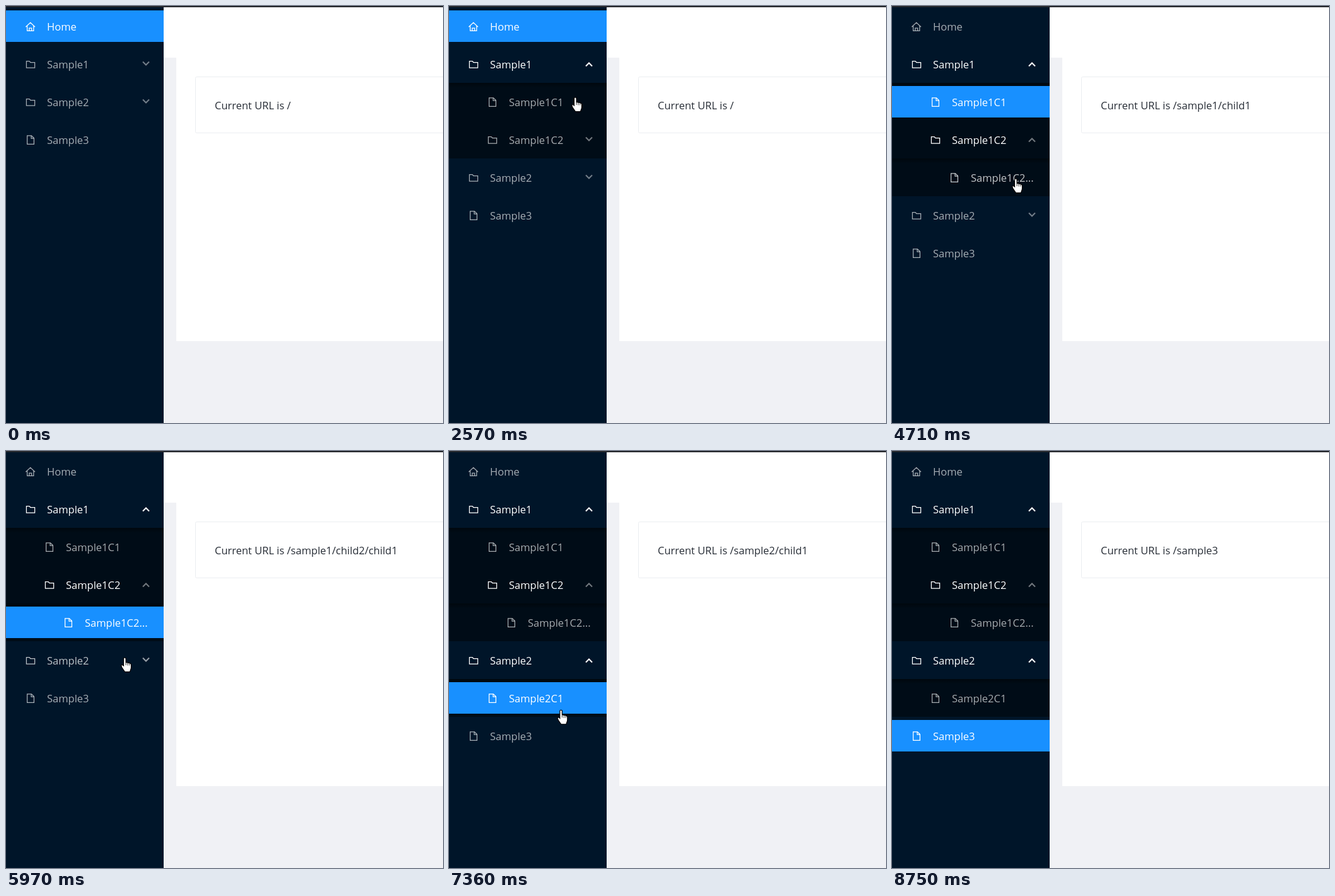
An HTML page with a canvas for the animation above (9.74 s loop, 693x662 px).

```html
<!DOCTYPE html>
<html lang="en">
<head>
<meta charset="utf-8">
<title>Sidebar menu</title>
<style>
html, body { margin: 0; width: 100%; height: 100%; overflow: hidden; background: #f0f1f5; }
canvas { display: block; }
</style>
</head>
<body>
<canvas id="stage" width="693" height="662"></canvas>
<script>
const ctx = document.getElementById('stage').getContext('2d');
const LOOP = 9740, ROW = 60, SIDE = 250;
const FONT = '16.5px "Open Sans", "Noto Sans", sans-serif';

// lit: text turns white, sel: blue background, open: submenu unfolds (ms)
const menu = [
  { label: 'Home', icon: 'home', lit: [-999, 2710], sel: [-999, 2710] },
  { label: 'Sample1', icon: 'folder', lit: [950], open: 1940, kids: [
    { label: 'Sample1C1', icon: 'file', lit: [2560, 4780], sel: [2710, 4780] },
    { label: 'Sample1C2', icon: 'folder', lit: [3480], open: 3970, kids: [
      { label: 'Sample1C2...', icon: 'file', lit: [4580, 6630], sel: [4780, 6630] }
    ] }
  ] },
  { label: 'Sample2', icon: 'folder', lit: [5850], open: 6050, kids: [
    { label: 'Sample2C1', icon: 'file', lit: [6480, 7740], sel: [6630, 7740] }
  ] },
  { label: 'Sample3', icon: 'file', lit: [7480], sel: [7740] }
];

const urls = [[0, '/'], [2710, '/sample1/child1'], [4780, '/sample1/child2/child1'],
  [6630, '/sample2/child1'], [7740, '/sample3']];

// Pointer stops: time, x, y
const stops = [
  [330, 442, 614], [1100, 197, 64], [1400, 198, 80], [1540, 197, 82], [2100, 197, 82],
  [2570, 195, 145], [3050, 195, 147], [3700, 193, 200], [4200, 193, 200], [4710, 191, 274],
  [5200, 190, 275], [5970, 183, 328], [6250, 182, 329], [6700, 175, 388], [7150, 175, 389],
  [7650, 168, 447], [8130, 168, 447], [8750, 258, 665]
];

// Icons are drawn around the row centre, x = 0 at the icon's left edge
const icons = {
  home: new Path2D('M.3 1.3 7.7-5.6 15 1.3M2.6-.3V7.4H12.8V-.3M5.8 7.4V3H9.6V7.4'),
  folder: new Path2D('M1.4-4.4H6L7.8-2.5H14.6V6H1.4Z'),
  file: new Path2D('M2.6-6.2H9.4L13.4-2.2V7.4H2.6ZM9-6.2V-1.8H13.4')
};
const hand = new Path2D('M3.5 13V1.8a1.8 1.8 0 0 1 3.6 0V7.5l6.4 1.4q2 .5 2 2.5v4q0 2-1 4l-1 3.1H5.5L1 16-.4 12.6q1.3-2 3.9.4z');
const fingers = new Path2D('M7.1 8v4M10 9v3.5M12.8 9.5v3');
const arrow = new Path2D('M5 0V18.5L9.3 14.4 12.3 21.2 15 20 12.1 13.4H18Z');

const clamp = v => Math.min(1, Math.max(0, v));
const cubic = p => p < .5 ? 4 * p ** 3 : 1 - 4 * (1 - p) ** 3;
const ramp = (t, from, span = 300) => cubic(clamp((t - from) / span));
const during = (t, [from, to = Infinity], lag = 0) => ramp(t, from) * (1 - ramp(t, to + lag));
const white = a => `rgba(255,255,255,${a})`;

function box(color, x, y, w, h) {
  ctx.fillStyle = color;
  ctx.fillRect(x, y, w, h);
}

function text(str, x, y, color) {
  ctx.font = FONT;
  ctx.fillStyle = color;
  ctx.fillText(str, x, y);
}

const listHeight = (items, t) => items.reduce((sum, it) => sum + ROW + foldHeight(it, t), 0);
const foldHeight = (it, t) => it.kids ? ramp(t, it.open, 240) * listHeight(it.kids, t) : 0;

function chevron(it, y, t, depth, lit) {
  const turn = ramp(t, it.open);
  const mid = y + 29 + 2 * turn, dip = 2.5 - 5 * turn;
  ctx.strokeStyle = white(depth ? .45 : .45 + .55 * Math.min(lit, 1));
  ctx.lineWidth = 2;
  ctx.beginPath();
  ctx.moveTo(217, mid - dip);
  ctx.lineTo(222, mid + dip);
  ctx.lineTo(227, mid - dip);
  ctx.stroke();
}

function drawRow(it, y, t, depth) {
  const lit = during(t, it.lit, 200), left = 31 + 30 * depth;
  const color = white(.65 + .35 * lit);
  if (it.sel) {
    ctx.save();
    ctx.globalAlpha *= during(t, it.sel);
    box('#1890ff', 0, y + 5, SIDE, 50);
    ctx.restore();
  }
  ctx.save();
  ctx.translate(left, y + 30);
  ctx.strokeStyle = color;
  ctx.lineWidth = 1.25;
  ctx.stroke(icons[it.icon]);
  ctx.restore();
  text(it.label, left + 34, y + 37, color);
  if (it.kids) chevron(it, y, t, depth, lit);
}

function drawList(items, y, t, depth = 0) {
  for (const it of items) {
    drawRow(it, y, t, depth);
    y += ROW;
    const h = foldHeight(it, t);
    if (h > 0) {
      ctx.save();
      ctx.beginPath();
      ctx.rect(0, y, SIDE, h);
      ctx.clip();
      box('#000c17', 0, y, SIDE, h);
      const shade = ctx.createLinearGradient(0, y, 0, y + 8);
      shade.addColorStop(0, 'rgba(0,0,0,.4)');
      shade.addColorStop(1, 'rgba(0,0,0,0)');
      box(shade, 0, y, SIDE, 8);
      ctx.globalAlpha *= ramp(t, it.open, 240);
      drawList(it.kids, y, t, depth + 1);
      ctx.restore();
      y += h;
    }
  }
}

function drawPointer(t) {
  const i = stops.findIndex(s => s[0] > t);
  if (i < 1) return;
  const [t0, x0, y0] = stops[i - 1], [t1, x1, y1] = stops[i];
  const p = (t - t0) / (t1 - t0), k = p * p * (3 - 2 * p);
  const x = x0 + (x1 - x0) * k, y = y0 + (y1 - y0) * k;
  const onMenu = x + 5 < SIDE && y < 2 + listHeight(menu, t);
  const shape = onMenu ? hand : arrow;
  ctx.save();
  ctx.translate(x, y);
  ctx.fillStyle = '#fff';
  ctx.strokeStyle = '#000';
  ctx.lineWidth = 1.2;
  ctx.fill(shape);
  ctx.stroke(shape);
  if (onMenu) {
    ctx.lineWidth = .8;
    ctx.stroke(fingers);
  }
  ctx.restore();
}

function drawPage(t) {
  box('#f0f1f5', 0, 0, 693, 662);
  box('#fff', SIDE, 2, 443, 80);
  box('#fff', 270, 82, 423, 450);
  ctx.strokeStyle = '#ebeef1';
  ctx.lineWidth = 1;
  ctx.beginPath();
  ctx.roundRect(300.5, 112.5, 420, 89, 2);
  ctx.stroke();
  const url = urls.filter(u => u[0] <= t).pop()[1];
  text('Current URL is ' + url, 331, 164, '#262c35');
  box('#001529', 0, 0, SIDE, 662);
  box('#24272c', 0, 0, 693, 2);
}

function frame(now) {
  const t = now % LOOP;
  drawPage(t);
  drawList(menu, 2, t);
  drawPointer(t);
  requestAnimationFrame(frame);
}
requestAnimationFrame(frame);
</script>
</body>
</html>
```
